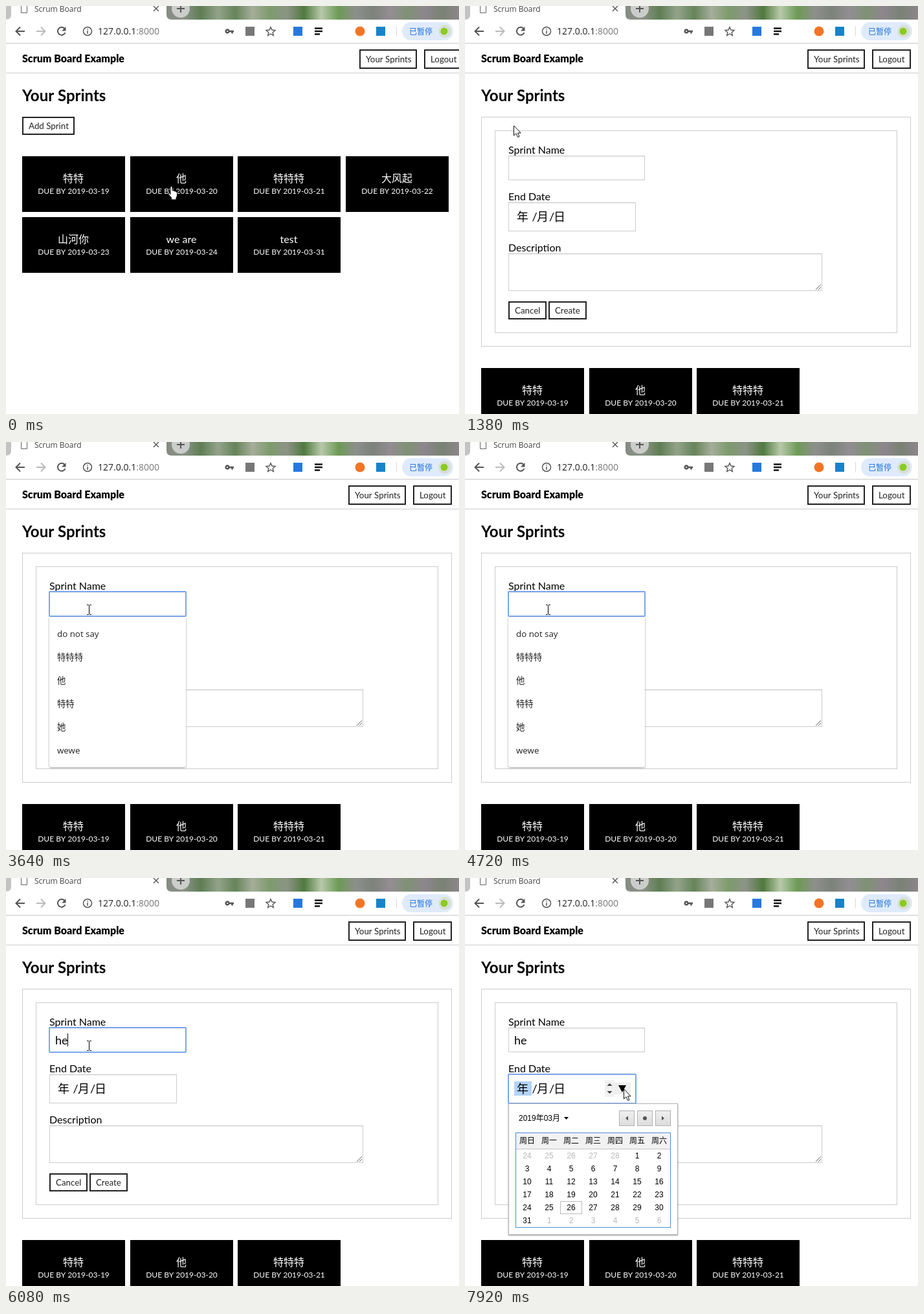
Write an HTML page with a canvas that moves like this. It is 700 by 630 pixels and loops after 8 s.

```html
<!DOCTYPE html>
<html lang="en">
<head>
<meta charset="utf-8">
<title>Scrum Board</title>
<style>
html, body { margin: 0; width: 100%; height: 100%; overflow: hidden; background: #fff; }
canvas { display: block; }
</style>
</head>
<body>
<canvas id="stage" width="700" height="630"></canvas>
<script>
const ctx = document.getElementById('stage').getContext('2d');
const LOOP = 8000;
const CJK = '"Noto Sans CJK SC", "Noto Sans CJK", sans-serif';
const LATO = 'Lato, ' + CJK;
const OPEN = '"Open Sans", ' + CJK;
const ARIAL = '"Liberation Sans", ' + CJK;
const MONO = '"Liberation Mono", monospace';
const FOCUS = '#7ba6ee', INK = '#222';

// [start, shape, x, y]
const POINTER = [
  [0, 'hand', 250, 278], [700, 'arrow', 190, 247], [830, 'arrow', 132, 215],
  [980, 'arrow', 92, 193], [1100, 'arrow', 75, 184], [1530, 'arrow', 67, 187],
  [1680, 'beam', 114, 247], [1830, 'beam', 125, 251], [6580, 'beam', 180, 250],
  [6700, 'arrow', 233, 286], [6860, 'arrow', 278, 338], [6980, 'arrow', 272, 337],
  [7120, 'arrow', 201, 326], [7260, 'arrow', 225, 325], [7380, 'arrow', 236, 324],
  [7500, 'arrow', 243, 324], [7920, 'arrow', 245, 325]
];
// [start, text, caret visible]
const TYPING = [
  [2100, '', 1], [2640, '', 0], [3070, '', 1], [3640, '', 0], [4190, '', 1], [4720, '', 0],
  [5250, 'h', 1], [5780, 'he', 1], [6580, 'he', 0], [7120, 'he', 1], [7650, 'he', 0]
];
const CARDS = [['特特', 19], ['他', 20], ['特特特', 21], ['大风起', 22], ['山河你', 23], ['we are', 24], ['test', 31]];

const latest = (rows, t) => rows.filter(row => row[0] <= t).pop();
const between = (t, a, b) => t >= a && t < b;

function rect(x, y, w, h, color) {
  ctx.fillStyle = color;
  ctx.fillRect(x, y, w, h);
}

function frame(x, y, w, h, color, line = 1) {
  ctx.strokeStyle = color;
  ctx.lineWidth = line;
  ctx.strokeRect(x + line / 2, y + line / 2, w - line, h - line);
}

function round(x, y, w, h, r, color) {
  ctx.fillStyle = color;
  ctx.beginPath();
  ctx.roundRect(x, y, w, h, r);
  ctx.fill();
}

function disc(x, y, r, color) {
  ctx.fillStyle = color;
  ctx.beginPath();
  ctx.arc(x, y, r, 0, 7);
  ctx.fill();
}

function text(str, x, y, size, color = '#000', family = LATO, weight = 400, align = 'left') {
  ctx.font = `${weight} ${size}px ${family}`;
  ctx.fillStyle = color;
  ctx.textAlign = align;
  ctx.fillText(str, x, y);
}

function path(d, stroke, line = 1, fill) {
  const shape = new Path2D(d);
  if (fill) { ctx.fillStyle = fill; ctx.fill(shape); }
  if (stroke) { ctx.strokeStyle = stroke; ctx.lineWidth = line; ctx.stroke(shape); }
}

const fillPath = (d, color) => path(d, null, 0, color);

function shadowed(blur, draw) {
  ctx.save();
  ctx.shadowColor = 'rgba(0,0,0,.4)';
  ctx.shadowBlur = blur;
  ctx.shadowOffsetY = 1;
  draw();
  ctx.restore();
}

function browser() {
  const photo = ctx.createLinearGradient(248, 0, 700, 0);
  ['#858b82', '#8b9387', '#5f7d54', '#93a38b', '#66845a', '#a5ad9a', '#7d9b6c', '#8c9386',
    '#50793f', '#b8c9aa', '#6d9a56', '#8d8f8b', '#7d827b', '#938d93', '#7f9175', '#8d868d', '#7a8274', '#8c858b']
    .forEach((color, i, all) => photo.addColorStop(i / (all.length - 1), color));
  rect(0, 0, 700, 21, photo);
  rect(0, 0, 20, 21, '#c3c3c3');
  fillPath('M8 0H248V13Q248 21 256 21H0Q8 21 8 13Z', '#fff');
  path('M23.5 -4V10.5H32.5V0L29 -4Z', '#666');
  text('Scrum Board', 44, 9, 12, '#444', OPEN);
  path('M228 0L236 8M236 0L228 8', '#555', 1.4);
  disc(270, 4, 14, '#cbcdca');
  path('M264 4H276M270 -2V10', '#555', 2);

  rect(0, 57, 700, 1, '#c8c8c8');
  path('M29 39H16M22 32.5L15.5 39L22 45.5', '#555', 2);
  path('M47 39H60M54 32.5L60.5 39L54 45.5', '#bbb', 2);
  path('M91.5 41A6 6 0 1 1 90.3 34.7', '#555', 2);
  fillPath('M92.5 32V38.5H86Z', '#555');
  path('M132.5 39A6.5 6.5 0 1 1 119.5 39A6.5 6.5 0 1 1 132.5 39M126 38V43M126 35V36.6', '#555', 1.5);
  text('127.0.0.1', 142, 44, 14, INK, OPEN);
  const host = ctx.measureText('127.0.0.1').width;
  text(':8000', 142 + host, 44, 14, '#777', OPEN);

  path('M344.5 39A2.4 2.4 0 1 1 339.7 39A2.4 2.4 0 1 1 344.5 39M345 39H352M349.5 39V42.5', '#555', 2.6);
  rect(370, 32, 14, 14, '#777');
  path('M409 32.5L411 37L416 37.5L412.2 40.8L413.3 45.6L409 43L404.7 45.6L405.8 40.8L402 37.5L407 37Z', '#555', 1.4);
  rect(444, 32, 14, 14, '#2878dc');
  path('M477 34.5H489M477 39H489M477 43.5H485', '#111', 2.4);
  disc(547, 39, 7.5, '#f37524');
  rect(572, 32, 14, 14, '#1783c8');
  rect(603, 31, 1, 16, '#d5d8dc');
  round(612, 25, 79, 28, 14, '#dfebfc');
  text('已暂停', 623, 44, 12, '#1a6fe0', CJK);
  disc(678, 39, 10, '#d8dfd2');
  disc(677, 39, 5.5, '#8acb22');
}

function button(label, x, y, w, h, dark) {
  rect(x, y, w, h, dark ? INK : '#fff');
  frame(x, y, w, h, INK, 2);
  text(label, x + 10, y + h / 2 + 5, 13.333, dark ? '#fff' : INK);
}

function header(shift) {
  text('Scrum Board Example', 25, 87, 16, '#000', LATO, 900);
  button('Your Sprints', 546 - shift, 67, 89, 30);
  button('Logout', 646 - shift, 67, 60, 30);
  rect(0, 103, 700, 1, '#ccc');
  text('Your Sprints', 25, 147, 24, '#000', LATO, 700);
}

function cards(top, count) {
  CARDS.slice(0, count).forEach(([name, day], i) => {
    const x = Math.round(25 + (i % 4) * 166.6), y = top + 94 * Math.floor(i / 4);
    rect(x, y, 159, 86, '#000');
    text(name, x + 79, y + 40, 16, '#fff', LATO, 400, 'center');
    text('DUE BY 2019-03-' + day, x + 79.5, y + 58, 12, '#fff', LATO, 400, 'center');
  });
}

function field(x, y, w, h, focused) {
  rect(x, y, w, h, '#fff');
  rect(x + 1, y + 1, w - 2, 1, '#eee');
  frame(x, y, w, h, '#ccc');
  if (!focused) return;
  ctx.strokeStyle = FOCUS;
  ctx.lineWidth = 2;
  ctx.beginPath();
  ctx.roundRect(x, y, w, h, 1);
  ctx.stroke();
}

function dateField(t) {
  const focused = t >= 7650;
  field(67, 303, 197, 45, focused);
  if (focused) rect(76, 314, 27, 22, '#b3d3fb');
  [['年', 80], ['/', 103.5], ['月', 111], ['/', 130], ['日', 137]].forEach(([s, x]) => text(s, x, 332, 18));
  if (t < 7120) return;
  const onSpinner = between(t, 7260, 7380);
  rect(216, 312, 15, 26, '#f1f1f1');
  if (onSpinner) rect(216, 312, 15, 13, '#c9c9c9');
  if (t >= 7380) rect(231, 316, 25, 18, '#eee');
  fillPath('M219.5 321H227.5L223.5 317ZM219.5 329H227.5L223.5 333Z', '#444');
  fillPath('M237 320H249L243 331Z', '#000');
}

function form(t) {
  frame(25, 171, 664, 355, '#ccc');
  frame(46, 192, 622, 313, '#ccc');
  text('Sprint Name', 67, 228, 16);
  field(67, 231, 211, 38, between(t, 2100, 7650));
  text('End Date', 67, 300, 16);
  dateField(t);
  text('Description', 67, 379, 16);
  field(67, 382, 485, 58);
  path('M542 438L550 430M546 438L550 434', '#666');
  button('Cancel', 67, 456, 59, 28);
  button('Create', 129, 456, 59, 28);

  const typed = latest(TYPING, t);
  if (!typed) return;
  const [, value, caret] = typed;
  text(value, 76, 257, 18);
  if (caret) rect([76, 86, 95][value.length], 240, 1, 20, '#000');
}

function suggestions() {
  shadowed(3, () => round(67, 271, 211, 231, [0, 0, 3, 3], '#fff'));
  ['do not say', '特特特', '他', '特特', '她', 'wewe']
    .forEach((s, i) => text(s, 79, 301 + 36 * i, 13.333, INK, OPEN));
}

function inputMethod(value) {
  const first = value === 'h';
  const right = first ? 421 : 373;
  const words = first ? ['好', '后', '话', '\\(^o^)/~', '和'] : ['和', '喝', '何', '河', '合'];
  rect(76, 261, right - 76, 56, '#fff');
  frame(76, 261, right - 76, 56, '#a8c3d6');
  text(value, 87, 281, 16, '#0b6db8', ARIAL, 700);
  rect(88 + ctx.measureText(value).width, 267, 1, 18, '#000');
  rect(86, 288, right - 118, 1, '#d6dde2');
  let x = 86;
  words.forEach((word, i) => {
    const color = i ? '#0a84d0' : '#e8222a';
    const ascii = word.length > 1;
    text(`${i + 1}.`, x, 307, 13.333, color, MONO);
    text(word, x + 16, ascii ? 307 : 308, ascii ? 13.333 : 16, color, ascii ? MONO : CJK);
    x += 29.4 + (ascii ? 64 : 16);
  });
  rect(right - 30, 263, 28, 28, '#f58d62');
  [[61, 15], [47, 15], [24, 15]].forEach(([dx, w]) => frame(right - dx, 295, w, 15, '#c2d9e8'));
  ctx.save();
  ctx.translate(right, 302.5);
  fillPath('M-52 -3V3L-55 0Z', '#b5cfe0');
  fillPath('M-41 -3V3L-38 0ZM-20 -2H-13L-16.5 2Z', '#1778b8');
  ctx.restore();
}

function calendar() {
  shadowed(2, () => rect(67, 348, 262, 203, '#fff'));
  frame(67, 348, 262, 203, '#b5b5b5');
  text('2019年03月', 83, 375, 12, '#000', ARIAL);
  fillPath('M153 369H160L156.5 373Z', '#000');
  const shade = ctx.createLinearGradient(0, 359, 0, 383);
  shade.addColorStop(0, '#f0f0f0');
  shade.addColorStop(1, '#dcdcdc');
  [238, 266, 294].forEach(x => {
    round(x, 359, 24, 24, 2, shade);
    frame(x, 359, 24, 24, '#b0b0b0');
  });
  fillPath('M252 367.5V374.5L248 371ZM304 367.5V374.5L308 371Z', '#555');
  disc(278, 371, 3, '#555');

  rect(78, 393, 240, 26, '#f2f2f2');
  rect(78, 418, 240, 1, '#c4c4c4');
  frame(78, 393, 240, 147, '#4a90d9');
  [...'日一二三四五六'].forEach((d, i) => text('周' + d, 96 + 34 * i, 410, 12, '#000', CJK, 400, 'center'));
  for (let i = 0; i < 42; i++) {
    const day = i - 4;
    const label = day < 1 ? day + 28 : day > 31 ? day - 31 : day;
    const x = 96 + 34 * (i % 7), y = 433 + 20 * Math.floor(i / 7);
    if (day === 26) frame(x - 17, y - 14, 34, 20, '#bbb');
    text(label, x, y, 12, label === day ? '#000' : '#b8b8b8', ARIAL, 400, 'center');
  }
}

function pointer(t) {
  const [, shape, x, y] = latest(POINTER, t);
  ctx.save();
  ctx.translate(x, y);
  if (shape === 'arrow') {
    path('M.5 .8V16L4 12.8L6.5 18.5L9 17.5L6.5 12H11.2Z', '#111', 1, '#fff');
  } else if (shape === 'beam') {
    path('M0 .5H2.5L3.5 1.5L4.5 .5H7M3.5 1V15M0 15.5H2.5L3.5 14.5L4.5 15.5H7', '#000');
  } else {
    path('M4 13V2Q4 .5 5.5 .5Q7 .5 7 2V7Q9.5 6 10 8Q12 7 12.5 9Q14.5 8.5 14.5 11V14Q14.5 16 13 18V21H5.5V18L1 12.5Q.5 10 2.5 10.5Z', '#111', 1, '#fff');
  }
  ctx.restore();
}

function draw(t) {
  const editing = t >= 1380;
  rect(0, 0, 700, 630, '#fff');
  browser();
  header(editing ? 17 : 0);
  if (editing) {
    form(t);
    cards(559, 3);
  } else {
    button('Add Sprint', 25, 171, 81, 28, t >= 980);
    if (t >= 1250) frame(24, 170, 83, 30, '#5b8fe6', 1.5);
    cards(232, 7);
  }
  if (between(t, 2100, 5250)) suggestions();
  if (between(t, 5250, 6080)) inputMethod(t < 5780 ? 'h' : 'he');
  if (t >= 7780) calendar();
  pointer(t);
}

function tick() {
  draw(performance.now() % LOOP);
  requestAnimationFrame(tick);
}
tick();
</script>
</body>
</html>
```
